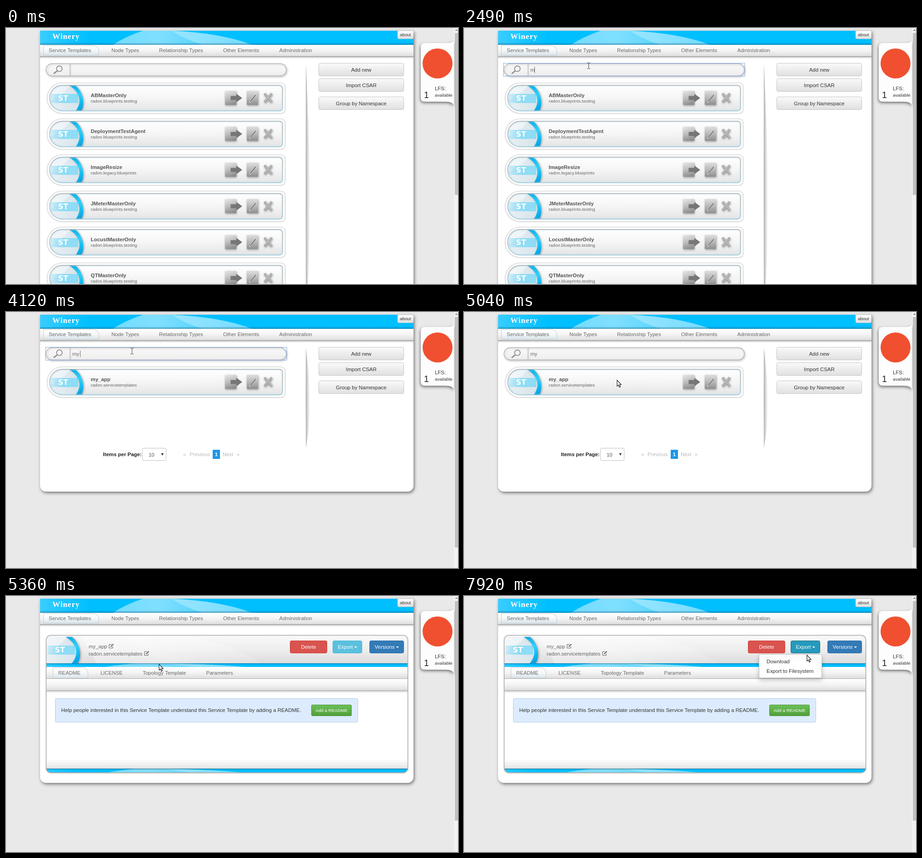
Write an HTML page with a canvas that moves like this. It is 995 by 563 pixels and loops after 7.99 s.

```html
<!DOCTYPE html>
<html lang="en">
<head>
<meta charset="utf-8">
<title>Service templates</title>
<style>
  html, body { margin: 0; width: 100%; height: 100%; overflow: hidden; background: #e9e9e9; }
  canvas { display: block; }
</style>
</head>
<body>
<canvas id="stage" width="995" height="563"></canvas>
<script>
const ctx = document.getElementById('stage').getContext('2d');
const LOOP = 7990, STEP = 78;
const SANS = '"Liberation Sans", Arial, sans-serif';
const BLUE = '#00bfff';

// Drawing helpers
function gradient(x0, y0, x1, y1, ...colors) {
  const g = ctx.createLinearGradient(x0, y0, x1, y1);
  colors.forEach((c, i) => g.addColorStop(i / (colors.length - 1), c));
  return g;
}
const vertical = (y0, y1, ...colors) => gradient(0, y0, 0, y1, ...colors);
const across = (x0, x1, ...colors) => gradient(x0, 0, x1, 0, ...colors);
const white = alpha => `rgba(255,255,255,${alpha})`;
const black = alpha => `rgba(0,0,0,${alpha})`;

function paint(path, fill, stroke, width = 1) {
  if (fill) { ctx.fillStyle = fill; ctx.fill(path); }
  if (stroke) { ctx.strokeStyle = stroke; ctx.lineWidth = width; ctx.stroke(path); }
}
function rounded(x, y, w, h, r) {
  const p = new Path2D();
  p.roundRect(x, y, w, h, r);
  return p;
}
const box = (x, y, w, h, r, fill, stroke, width) => paint(rounded(x, y, w, h, r), fill, stroke, width);
const shape = (d, fill, stroke, width) => paint(new Path2D(d), fill, stroke, width);

function text(s, x, y, color = '#666', size = 11.45, weight = '', align = 'left') {
  ctx.font = `${weight} ${size}px ${SANS}`;
  ctx.fillStyle = color;
  ctx.textAlign = align;
  ctx.fillText(s, x, y);
}
function scoped(draw) { ctx.save(); draw(); ctx.restore(); }
function shadowed(blur, dx, dy, color, draw) {
  scoped(() => {
    Object.assign(ctx, { shadowBlur: blur, shadowOffsetX: dx, shadowOffsetY: dy, shadowColor: color });
    draw();
  });
}
function at(x, y, draw) { scoped(() => { ctx.translate(x, y); draw(); }); }

// Page frame
function blueBar(x, y, w, h, shift) {
  scoped(() => {
    ctx.clip(rounded(x, y, w, h, 0));
    ctx.fillStyle = BLUE;
    ctx.fillRect(x, y, w, h);
    ctx.translate(x + shift, y);
    ctx.scale(1, h / 31);
    shape('M0 0H226Q200 8 160 31H0Z', across(0, 110, white(.22), white(0)));
    shape('M226 0H290Q315 18 358 31H160Q190 12 226 0Z', across(160, 358, white(.45), white(.5), white(.35)));
    shape('M290 0Q400 5 467 31H358Q315 18 290 0Z', across(290, 467, white(.6), white(.45)));
  });
}
function strip(x, y, w, h) {
  box(x, y, w, h, 0, vertical(y, y + h, '#ffffff', '#f4f4f4', '#dedede'));
}
function selectedTab(x, y, w, h) {
  shape(`M${x} ${y + h}V${y}H${x + w - 14}Q${x + w} ${y} ${x + w} ${y + 14}V${y + h}Z`,
    vertical(y, y + h, '#ffffff', '#f4f8fa', '#d9e4ea'), '#c2cbd0');
}

function page(bottom) {
  ctx.fillStyle = '#e9e9e9';
  ctx.fillRect(0, 0, 995, 563);
  shadowed(7, 2, 3, black(.5), () => box(75, 6, 822, bottom - 6, [0, 0, 13, 13], '#fff'));
  blueBar(75, 6, 822, 31, 0);
  box(75, 32, 822, 5, 0, vertical(32, 37, 'rgba(0,70,100,0)', 'rgba(0,70,100,.45)'));
  scoped(() => {
    ctx.font = 'bold 17px "Liberation Serif", serif';
    ctx.letterSpacing = '1px';
    ctx.fillStyle = '#fff';
    ctx.fillText('Winery', 102, 23.5);
  });
  strip(75, 37, 822, 25);
  box(75, 62, 822, 1.5, 0, '#9c9c9c');
  box(75, 63.5, 822, 4, 0, vertical(63, 68, black(.2), black(0)));
  selectedTab(82.5, 38.5, 122, 21.5);
  [['Service Templates', 94], ['Node Types', 232], ['Relationship Types', 337],
   ['Other Elements', 478], ['Administration', 601.5]].forEach(([s, x]) => text(s, x, 53));
  box(862, 6, 35, 18, [0, 0, 3, 3], vertical(6, 24, '#fff', '#dedede'), '#aebbc0', .7);
  text('about', 867, 18, '#333', 9.82);
}

function gitPanel() {
  shadowed(6, -1, 3, black(.5), () =>
    shape('M986 28Q983 33 972 33H922Q913 33 913 42V153Q913 162 922 162H968Q983 162 986 170Z', '#fdfdfd'));
  ctx.beginPath();
  ctx.arc(950, 78, 33, 0, 7);
  ctx.fillStyle = '#f05030';
  ctx.fill();
  text('1', 920, 154, '#222', 19.5);
  text('LFS:', 944, 137, '#333');
  text('available', 944, 151, '#333', 9.82);
}
function scrollbar(end) {
  box(986, 0, 9, 563, 0, '#f1f1f1');
  box(988, 11, 7, end - 11, 0, '#c1c1c1');
  shape('M988.5 6L991.5 3L994.5 6Z', '#777');
}

// List view
function badge(x, y) {
  at(x, y, () => {
    shape('M0 0H42C62 10 76 34 56 58H0Z', across(0, 60, '#eaf0f4', '#d8e5eb'));
    shape('M0 34Q26 24 46 0H0Z', white(.4));
    box(2, 19, 61, 20, 0, across(2, 63, 'rgba(120,215,245,.25)', '#8edcf5', '#8edcf5'));
    shadowed(4, 2, 1, black(.3), () =>
      shape('M42 0H56C72 12 80 38 69 58H56C76 34 62 10 42 0Z', gradient(44, 0, 72, 50, '#0aa5de', '#2cd3fd', '#08a6e4')));
    scoped(() => {
      ctx.font = 'bold 16px "DejaVu Sans", sans-serif';
      ctx.fillStyle = '#fff';
      ctx.fillText('ST', 18.5, 34);
    });
  });
}
function cardIcons() {
  const metal = gradient(395, 18, 405, 50, '#e6e6e6', '#bdbdbd', '#8a8a8a');
  shadowed(4, 1, 2, black(.35), () => {
    box(392, 18, 25, 31, 1, metal);
    box(440, 18, 25, 31, 1, vertical(18, 49, '#dedede', '#b9b9b9', '#8f8f8f'));
    shape('M479 24L495 43M495 24L479 43', null, '#a6a6a6', 5.5);
  });
  shape('M404.5 29.5H417V24.5L430 34L417 43.5V38.5H404.5Z', '#767676');
  shape('M446 45L448 39L459 26L461 28L450 41Z', '#737373', '#e4e4e4', .8);
  shape('M480 24L495 42M494 24L480 41', null, '#bcbcbc', 2.5);
}
function card(y, name, namespace) {
  at(90, y, () => {
    shadowed(2, 0, 1, black(.1), () => box(.5, .5, 524, 67, [34, 9, 9, 34], '#fff', '#d6d6d6', 1.2));
    const inner = rounded(6, 6, 513, 56.5, [28, 7, 7, 28]);
    paint(inner, vertical(6, 63, '#fff', '#f5f5f5', '#e4e4e4'));
    scoped(() => {
      ctx.clip(inner);
      badge(6, 6);
      paint(inner, null, 'rgba(150,210,235,.25)', 6);
    });
    paint(inner, null, vertical(6, 63, '#a6abae', '#b0b8bc', '#9fc6d8'), 1.5);
    text(name, 96.5, 31.5, '#555', 11.45, 'bold');
    text(namespace, 96.5, 44, '#666', 9.82);
    cardIcons();
  });
}
function divider(bottom) {
  shape(`M660 78Q677 ${78 + (bottom - 78) * .6} 660 ${bottom}Z`, across(660, 669, black(.28), black(0)));
  box(660, 85, 1, bottom - 100, 0, vertical(85, bottom - 15, black(.02), black(.22), black(.02)));
}
function search(value, focused, caret) {
  shadowed(4, 2, 2, black(.18), () =>
    box(88, 78.5, 529, 27, 13.5, vertical(78, 106, '#fafafa', '#ededed'), '#b0b0b0', 1.3));
  box(140, 79.5, 1.2, 25, 0, '#bcbcbc');
  box(141, 79.5, 4, 25, 0, across(141, 145, black(.1), black(0)));
  ctx.beginPath();
  ctx.arc(117.5, 89.5, 6.2, 0, 7);
  ctx.strokeStyle = '#8b8b8b';
  ctx.lineWidth = 1.8;
  ctx.stroke();
  shape('M112.5 94.5L105 100.5', null, '#8b8b8b', 2.8);
  if (focused) box(87, 77.5, 531, 28.5, 0, null, '#86aee3', 1.1);
  text(value, 146, 96, '#666');
  if (caret) box(value ? 147 + 8 * value.length : 147, 85, 1, 14, 0, '#666');
}
function pager() {
  text('Items per Page:', 213.5, 317, '#222', 11.45, 'bold');
  box(300.5, 299.5, 52, 27, 3, '#fff', '#bdbdbd');
  text('10', 314, 317.5, '#555');
  shape('M341.5 310.5H347L344.2 316Z', '#333');
  text('«', 390, 317, '#b8b8b8');
  text('Previous', 404, 317, '#b8b8b8');
  box(455, 303, 16, 20, 0, '#1c95e8');
  text('1', 463, 317, '#fff', 11.45, 'bold', 'center');
  text('Next', 477, 317, '#b8b8b8');
  text('»', 508, 317, '#b8b8b8');
}

const templates = ['ABMasterOnly', 'DeploymentTestAgent', 'ImageResize', 'JMeterMasterOnly', 'LocustMasterOnly', 'QTMasterOnly'];

function listView(t) {
  const filtered = t >= 2790;
  page(filtered ? 395 : 640);
  divider(filtered ? 300 : 630);
  const value = filtered ? 'my' : t >= 2490 ? 'm' : '';
  const caret = [[1550, 2170], [2490, 3340], [3890, 4430]].some(([a, b]) => t >= a && t < b);
  search(value, t >= 1470 && t < 4890, caret);
  if (filtered) {
    card(120, 'my_app', 'radon.servicetemplates');
    pager();
  } else {
    templates.forEach((name, i) =>
      card(Math.round(120 + i * 79.2), name, i === 2 ? 'radon.legacy.blueprints' : 'radon.blueprints.testing'));
  }
  [['Add new', 77.5], ['Import CSAR', 111.5], ['Group by Namespace', 151.5]].forEach(([s, y]) => {
    box(688.5, y, 187, 28, 3, vertical(y, y + 28, '#fafafa', '#e0e0e0'), '#c4c4c4');
    text(s, 782, y + 18, '#333', 11.45, '', 'center');
  });
  scrollbar(filtered ? 518 : t >= 2560 ? 398 : 367);
}

// Detail view
function button(x, w, label, fill, border, menu) {
  box(x + .5, 98.5, w - 1, 27, 3, fill, border);
  text(label, x + w / 2 - (menu ? 4.5 : 0), 116, '#fff', 11.45, '', 'center');
  if (menu) shape(`M${x + w - 17.5} 111h6.5l-3.25 3.3Z`, '#fff');
}
function editIcon(x, y) {
  shape(`M${x + 6} ${y + 1.5}H${x + .5}V${y + 9.5}H${x + 8.5}V${y + 6}`, null, '#666', 1.1);
  shape(`M${x + 4} ${y + 6.5}L${x + 10} ${y + .8}`, null, '#666', 2.2);
}
function menu() {
  shadowed(10, 0, 5, black(.2), () => box(649.5, 128.5, 138, 51.5, 3, '#fff', '#c4c4c4'));
  text('Download', 666, 147.5, '#333');
  text('Export to Filesystem', 666, 169, '#333');
}
function detailView(t) {
  page(411);
  const panel = rounded(88.5, 86.5, 796, 302, 10);
  shadowed(3, 0, 1, black(.3), () => paint(panel, '#fff'));
  scoped(() => {
    ctx.clip(panel);
    box(88, 87, 797, 61, 0, vertical(87, 148, '#f9f9f9', '#eeeeee', '#dcdcdc'));
    shape('M165 88H258Q300 108 345 148H200Z', white(.35));
    shape('M258 88H400Q500 105 560 148H345Q300 108 258 88Z', across(258, 560, white(.5), white(.1)));
    badge(89, 90);
    blueBar(88, 148, 797, 8, -30);
    box(88, 148, 797, 3, 0, vertical(148, 151, 'rgba(0,60,90,.5)', 'rgba(0,60,90,0)'));
    strip(88, 156, 797, 25);
    box(88, 181, 797, 1.3, 0, '#b5b5b5');
    strip(88, 183, 797, 24);
    box(88, 207.5, 797, 1.5, 0, '#a5a5a5');
    box(88, 209, 797, 5, 0, vertical(209, 214, black(.14), black(0)));
    box(88, 358, 797, 22, 0, vertical(358, 380, '#fff', '#e4e4e4'));
    blueBar(88, 380, 797, 9, -30);
    box(88, 379.5, 797, 3, 0, vertical(379.5, 382.5, 'rgba(0,60,90,.6)', 'rgba(0,60,90,0)'));
  });
  paint(panel, null, '#aaa', 1.4);
  text('my_app', 182, 114.5);
  text('radon.servicetemplates', 182, 130.5);
  editIcon(226.5, 105);
  editIcon(304.5, 121);
  selectedTab(103.5, 157.5, 77, 23);
  [['README', 115], ['LICENSE', 208], ['Topology Template', 301], ['Parameters', 440.5]]
    .forEach(([s, x]) => text(s, x, 173));
  button(625, 82, 'Delete', '#d9534f', '#d43f3a');
  const [fill, border] = t >= 6900 ? ['#269abc', '#1b6d85'] : t >= 6600 ? ['#31b0d5', '#269abc'] : ['#5bc0de', '#46b8da'];
  button(719, 65, 'Export', fill, border, true);
  button(800, 76, 'Versions', '#337ab7', '#2e6da4', true);
  box(108.5, 225.5, 666, 52, 2, '#dcecfe', '#b3cbe4');
  text('Help people interested in this Service Template understand this Service Template by adding a README.', 121.5, 255, '#333');
  box(672.5, 239.5, 88, 24, 2, vertical(239, 264, '#6ec058', '#4f9e3a'), '#4b9638');
  text('Add a README', 716.5, 255, '#fff', 9.82, '', 'center');
  if (t >= 6900) menu();
  scrollbar(494);
}

// Pointer
const moves = [
  [460, 1240, 899, 522, 274, 83],
  [4120, 4430, 274, 83, 337, 150],
  [6140, 6680, 337, 150, 751, 115],
  [7840, 7920, 751, 115, 755, 130]
];
const clicks = [[1470, 1710, 274, 82], [4580, 4890, 336, 158], [6830, 6980, 751, 119]];
const ease = u => u * u * (3 - 2 * u);

function pointer(t) {
  const move = moves.filter(m => t >= m[0]).pop();
  if (!move) return;
  const [start, end, x0, y0, x1, y1] = move;
  const elapsed = Math.floor((t - start) / STEP + .02) * STEP + STEP / 2;
  const u = t >= end ? 1 : ease(Math.min(1, elapsed / (end - start)));
  const x = x0 + (x1 - x0) * u, y = y0 + (y1 - y0) * u;

  clicks.filter(([a, b]) => t >= a && t < b).forEach(([, , cx, cy]) => {
    ctx.beginPath();
    ctx.arc(cx, cy, 9.5, 0, 7);
    ctx.fillStyle = 'rgba(250,238,50,.7)';
    ctx.fill();
  });
  const overSearch = t < 4890 && x > 88 && x < 617 && y > 78 && y < 106;
  const overExport = t > 5230 && x > 719 && x < 784 && y > 98 && y < 126;
  at(Math.round(x), Math.round(y), () => {
    if (overSearch) {
      shape('M-3 -6.5H-1L.5 -5.5L2 -6.5H4M.5 -5.5V5.5M-3 6.5H-1L.5 5.5L2 6.5H4', null, '#444', 1);
    } else if (overExport) {
      shape('M-1.5 1Q0 -1 1.5 1V6.5Q3.5 5.5 4.5 7.3Q6 6.5 7 8.3Q8.5 8 8.5 10V13L6.5 18H-.5L-4.5 11.5Q-4.5 9.5 -1.5 11.5Z', '#fff', '#111', 1.1);
      shape('M1.5 6.5V10M4.5 7.5V10.5M7 8.5V11', null, '#111', .8);
    } else {
      shape('M0 0V13.3L3 10.5L5 15.5L7.3 14.5L5.2 9.8H9Z', '#fff', '#111', 1.1);
    }
  });
}

function render() {
  const t = performance.now() % LOOP;
  (t < 5230 ? listView : detailView)(t);
  gitPanel();
  pointer(t);
  requestAnimationFrame(render);
}
render();
</script>
</body>
</html>
```
